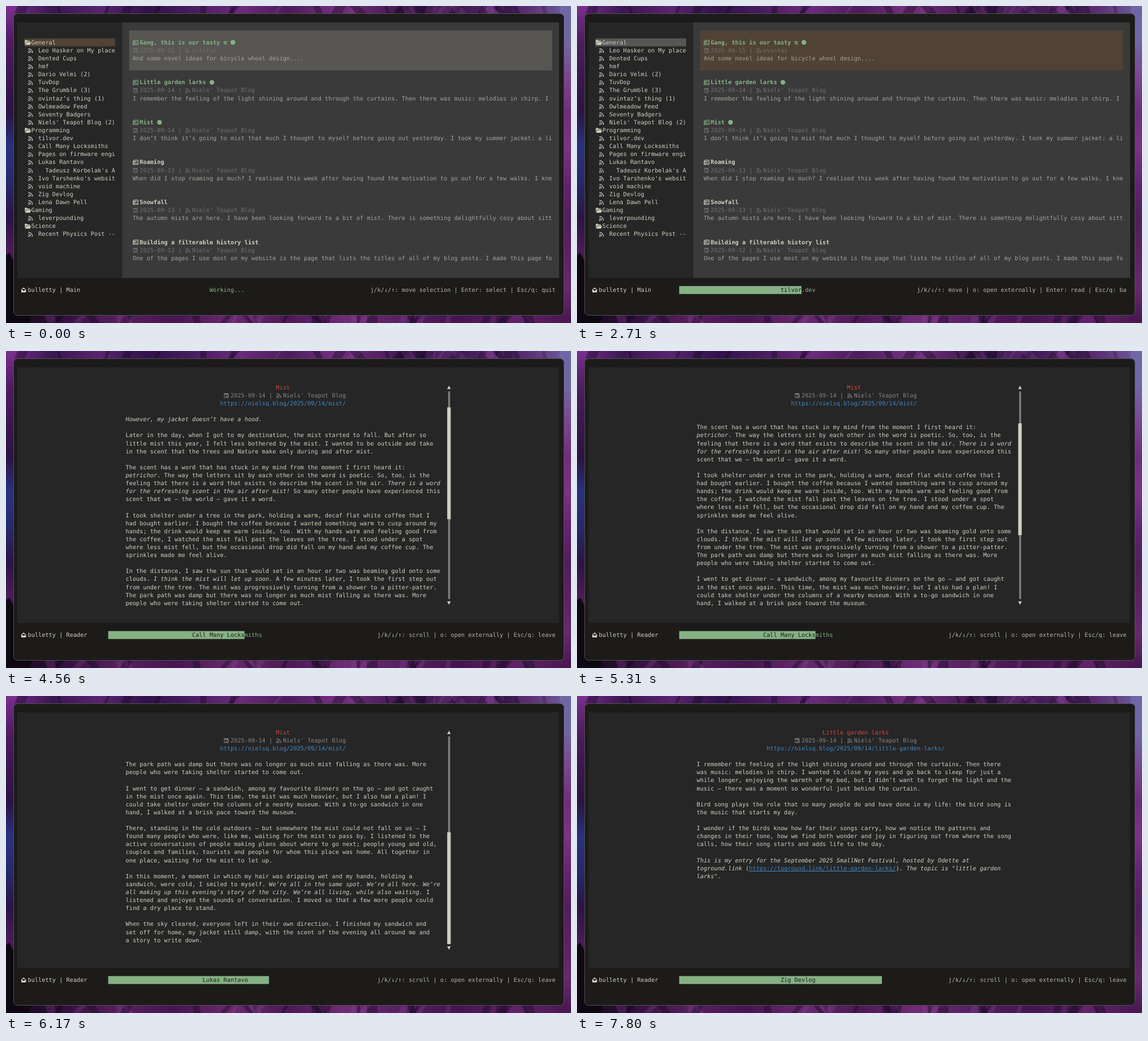
Write an HTML page with a canvas that moves like this. It is 999 px wide and 560 px high and loops after 8 s.

```html
<!DOCTYPE html>
<html lang="en">
<head>
<meta charset="utf-8">
<title>bulletty</title>
<style>
html, body { margin: 0; width: 100%; height: 100%; overflow: hidden; background: #1c1b1a; }
canvas { display: block; width: 999px; height: 560px; }
</style>
</head>
<body>
<canvas id="stage"></canvas>
<script>
const W = 999, H = 560, LOOP = 8000;
const CW = 6.18, CH = 14.11, X0 = 20, Y0 = 29;
const C = {
  frame: '#1c1b1a', side: '#262626', list: '#3a3a3a', fg: '#d0cfc0', text: '#a3a29a',
  faint: '#706f6b', meta: '#858480', hint: '#b5b4a8', green: '#86b184', brown: '#504335',
  grey: '#575653', red: '#d0483f', link: '#4187c4'
};

const canvas = document.getElementById('stage');
const ctx = canvas.getContext('2d');
const dpr = window.devicePixelRatio || 1;
canvas.width = W * dpr;
canvas.height = H * dpr;
ctx.scale(dpr, dpr);

const FONT = (CW / 0.602).toFixed(3) + 'px "DejaVu Sans Mono", "Noto Sans Mono", monospace';
ctx.font = FONT;
ctx.textRendering = 'geometricPrecision';
ctx.letterSpacing = (CW - ctx.measureText('0'.repeat(50)).width / 50).toFixed(4) + 'px';

// ---------- content ----------
const GROUPS = [
  ['General', ['Leo Hasker on My place', 'Dented Cups', 'hmf', 'Dario Velmi', 'TuvDop', 'The Grumble',
    'ovintaz’s thing', 'Owlmeadow Feed', 'Seventy Badgers', "Niels' Teapot Blog"]],
  ['Programming', ['tilvor.dev', 'Call Many Locksmiths', 'Pages on firmware engineering', 'Lukas Rantavo',
    "  Tadeusz Korbelak's Algorithmic Shed", "Ivo Tarshenko's website", 'void machine', 'Zig Devlog', 'Lena Dawn Pell']],
  ['Gaming', ['leverpounding']],
  ['Science', ['Recent Physics Post -- Daily']]
];
const FEEDS = GROUPS.flatMap(g => g[1]);
const TOTAL = 21;
const TEAPOT = FEEDS[9];

const art = (title, date, author, preview, unread) => ({ title, date, author, preview, unread });
const GENERAL = [
  art('Gang, this is our tasty π', '2025-09-15', 'ovintaz', 'And some novel ideas for bicycle wheel design....', true),
  art('Little garden larks', '2025-09-14', TEAPOT, 'I remember the feeling of the light shining around and through the curtains. Then there was music: melodies in chirp. I', true),
  art('Mist', '2025-09-14', TEAPOT, 'I don’t think it’s going to mist that much I thought to myself before going out yesterday. I took my summer jacket: a li', true),
  art('Roaming', '2025-09-13', TEAPOT, 'When did I stop roaming as much? I realised this week after having found the motivation to go out for a few walks. I kne'),
  art('Snowfall', '2025-09-13', TEAPOT, 'The autumn mists are here. I have been looking forward to a bit of mist. There is something delightfully cosy about sitt'),
  art('Building a filterable history list', '2025-09-12', TEAPOT, 'One of the pages I use most on my website is the page that lists the titles of all of my blog posts. I made this page fo')
];

const LINES = [
  'It has been a while since I last wrote about the tools on my desk.',
  'This week I finally sat down and cleaned up the old notes folder.',
  'There is a small trick that makes the whole thing a lot simpler.',
  'A reader asked me how the first version of this came to be made.',
  'Most of the work turned out to be deciding what to leave out of it.',
  'I have been thinking about slow software and quiet evenings lately.',
  'Here is a short list of things that went well, and some that did not.'
];
const feedArticles = (feed, month, unread, titles) => titles.split('|').map((title, i) =>
  art(title, `2025-0${month - (i >> 1)}-${28 - i * 3 - feed}`, FEEDS[feed],
    LINES[(feed * 2 + i) % 7] + ' ' + LINES[(feed + i * 3 + 3) % 7], i < unread));
const PAGES = [
  GENERAL,
  feedArticles(0, 8, 0, 'A desk of my own|Small habits, large effects|On keeping a paper list|The long way home|Three tools I dropped|Quiet weeks'),
  feedArticles(1, 7, 0, 'Things found in drawers|Glue and patience|How to mend a lamp|Spare parts|The second shelf|Loose screws'),
  feedArticles(2, 7, 0, 'cold mornings|last flight out|a room with no windows|supplies|the long night|arrivals'),
  feedArticles(3, 9, 2, 'Writing a reader for the terminal|Weekend projects|Keyboards and me|Notes from a game jam|Why I still use feeds|Hello again')
];

const MIST = `*I don’t think it’s going to mist that much* I thought to myself before going out yesterday.
I took my summer jacket: a light blue denim coat that brings me a lot of joy. My jacket
keeps me warm.

*However, my jacket doesn’t have a hood.*

Later in the day, when I got to my destination, the mist started to fall. But after so
little mist this year, I felt less bothered by the mist. I wanted to be outside and take
in the scent that the trees and Nature make only during and after mist.

The scent has a word that has stuck in my mind from the moment I first heard it:
*petrichor*. The way the letters sit by each other in the word is poetic. So, too, is the
feeling that there is a word that exists to describe the scent in the air. *There is a word
for the refreshing scent in the air after mist!* So many other people have experienced this
scent that we – the world – gave it a word.

I took shelter under a tree in the park, holding a warm, decaf flat white coffee that I
had bought earlier. I bought the coffee because I wanted something warm to cusp around my
hands; the drink would keep me warm inside, too. With my hands warm and feeling good from
the coffee, I watched the mist fall past the leaves on the tree. I stood under a spot
where less mist fell, but the occasional drop did fall on my hand and my coffee cup. The
sprinkles made me feel alive.

In the distance, I saw the sun that would set in an hour or two was beaming gold onto some
clouds. *I think the mist will let up soon.* A few minutes later, I took the first step out
from under the tree. The mist was progressively turning from a shower to a pitter-patter.
The park path was damp but there was no longer as much mist falling as there was. More
people who were taking shelter started to come out.

I went to get dinner – a sandwich, among my favourite dinners on the go – and got caught
in the mist once again. This time, the mist was much heavier, but I also had a plan! I
could take shelter under the columns of a nearby museum. With a to-go sandwich in one
hand, I walked at a brisk pace toward the museum.

There, standing in the cold outdoors – but somewhere the mist could not fall on us – I
found many people who were, like me, waiting for the mist to pass by. I listened to the
active conversations of people making plans about where to go next; people young and old,
couples and families, tourists and people for whom this place was home. All together in
one place, waiting for the mist to let up.

In this moment, a moment in which my hair was dripping wet and my hands, holding a
sandwich, were cold, I smiled to myself. *We’re all in the same spot. We’re all here. We’re
all making up this evening’s story of the city. We’re all living, while also waiting.* I
listened and enjoyed the sounds of conversation. I moved so that a few more people could
find a dry place to stand.

When the sky cleared, everyone left in their own direction. I finished my sandwich and
set off for home, my jacket still damp, with the scent of the evening all around me and
a story to write down.
`;
const LARKS = `I remember the feeling of the light shining around and through the curtains. Then there
was music: melodies in chirp. I wanted to close my eyes and go back to sleep for just a
while longer, enjoying the warmth of my bed, but I didn’t want to forget the light and the
music – there was a moment so wonderful just behind the curtain.

Bird song plays the role that so many people do and have done in my life: the bird song is
the music that starts my day.

I wonder if the birds know how far their songs carry, how we notice the patterns and
changes in their tone, how we find both wonder and joy in figuring out from where the song
calls, how their song starts and adds life to the day.

*This is my entry for the September 2025 SmallNet Festival, hosted by Odette at
toground.link *(~https://toground.link/little-garden-larks/~)*. The topic is "little garden
larks".*`;

// "*" toggles italics, "~" toggles a link; both carry over line ends
function parse(src) {
  let italic = false, link = false;
  return src.split('\n').map(line => {
    const runs = [];
    let col = 0;
    for (const part of line.split(/([*~])/)) {
      if (part === '*') italic = !italic;
      else if (part === '~') link = !link;
      else if (part) {
        runs.push({ part, col, italic, link });
        col += part.length;
      }
    }
    return runs;
  });
}
const READS = {
  1: { lines: parse(LARKS), url: 'https://nielsq.blog/2025/09/14/little-garden-larks/' },
  2: { lines: parse(MIST), url: 'https://nielsq.blog/2025/09/14/mist/', bar: true }
};

// ---------- timeline ----------
const at = (t, steps) => steps.reduce((v, s) => t >= s[0] ? s[1] : v, steps[0][1]);
const VIEW = [[0, 'side'], [2710, 'list'], [3690, 'read'], [6340, 'list'], [7360, 'read']];
const SIDE = [[0, 0], [500, 1], [1160, 2], [1600, 3], [1750, 4], [1910, 3], [2110, 2], [2260, 1], [2410, 0]];
const PICK = [[0, 0], [3030, 1], [3230, 2], [6790, 1]];
const FETCH = [[0, -1], [500, 2], [1600, 5], [1910, 7], [2110, 9], [2710, 10], [3030, 11],
  [5480, 12], [6170, 13], [6790, 14], [7360, 16], [7800, 17]];
const TAPS = [[0, 0], [4090, 1], [4240, 2], [4410, 3], [4560, 4], [4710, 5]];

// Single taps, then a held key
function scrollAt(t) {
  if (t < 5210) return at(t, TAPS);
  if (t >= 7360) return 0;
  const tick = t < 5380
    ? Math.min(5310, 5210 + Math.floor((t - 5210) / 50) * 50)
    : Math.min(5880, 5380 + Math.floor((t - 5380) / 50) * 50);
  return Math.floor(6 + (tick - 5210) / 33.3);
}

const stateAt = t => ({
  view: at(t, VIEW), side: at(t, SIDE), pick: at(t, PICK), fetch: at(t, FETCH),
  scroll: scrollAt(t), seen: t >= 3690
});

// ---------- drawing ----------
const px = col => X0 + col * CW;
const py = row => Y0 + row * CH;

function cells(c0, r0, c1, r1, color) {
  ctx.fillStyle = color;
  ctx.fillRect(px(c0), py(r0), (c1 - c0) * CW, (r1 - r0) * CH);
}
function text(s, col, row, color, style = '') {
  ctx.font = style + ' ' + FONT;
  ctx.fillStyle = color;
  ctx.fillText(s, px(col), py(row) + 10.6);
}
function poly(points, color) {
  ctx.fillStyle = color;
  ctx.beginPath();
  points.forEach(p => ctx.lineTo(p[0], p[1]));
  ctx.fill();
}
function disc(x, y, r, color) {
  ctx.fillStyle = color;
  ctx.beginPath();
  ctx.arc(x, y, r, 0, Math.PI * 2);
  ctx.fill();
}

const ICONS = {
  folder(c) {
    poly([[1, 11], [1, 3], [4.5, 3], [5.5, 4.3], [10, 4.3], [10, 6], [3.5, 6]], c);
    poly([[1.6, 11.6], [4, 6.8], [12.2, 6.8], [10, 11.6]], c);
  },
  rss(c) {
    disc(1.9, 10.6, 1.2, c);
    ctx.lineWidth = 1.2;
    for (const r of [4.2, 7.4]) {
      ctx.beginPath();
      ctx.arc(1, 11.4, r, -Math.PI / 2, 0);
      ctx.stroke();
    }
  },
  news() {
    ctx.strokeRect(2.5, 3.4, 7, 7.6);
    ctx.strokeRect(0.8, 5, 1.7, 6);
    ctx.fillRect(4, 5, 2, 2.4);
    ctx.fillRect(6.8, 5.2, 1.6, 0.9);
    ctx.fillRect(4, 8.6, 4.4, 0.9);
  },
  date() {
    ctx.strokeRect(1.4, 4, 6.6, 7);
    ctx.fillRect(1, 3.4, 7.4, 2);
    ctx.beginPath();
    ctx.arc(6.6, 8.8, 2.2, 0, Math.PI * 2);
    ctx.stroke();
  },
  mail(c) {
    poly([[0.8, 6], [5, 2.6], [9.2, 6], [9.2, 11.4], [0.8, 11.4]], c);
    poly([[2.4, 5.4], [7.6, 5.4], [7.6, 6.8], [5, 8.6], [2.4, 6.8]], C.frame);
  }
};
function icon(name, col, row, color) {
  ctx.save();
  ctx.translate(px(col), py(row));
  ctx.fillStyle = ctx.strokeStyle = color;
  ctx.lineWidth = 1;
  ICONS[name](color);
  ctx.restore();
}

function strip(x, y, w, h, stops) {
  const g = w > h ? ctx.createLinearGradient(x, 0, x + w, 0) : ctx.createLinearGradient(0, y, 0, y + h);
  stops.forEach((s, i) => g.addColorStop(i / (stops.length - 1), s));
  ctx.fillStyle = g;
  ctx.fillRect(x, y, w, h);
}

// Slanted light and dark flecks along the top and bottom edges
function flecks() {
  let seed = 7;
  const rnd = () => (seed = seed * 16807 % 2147483647) / 2147483647;
  for (let i = 0; i < 70; i++) {
    const x = 20 + rnd() * 930, y = i % 2 ? 547 : 0;
    const w = 4 + rnd() * 16, lean = rnd() * 24 - 12;
    poly([[x, y], [x + w, y], [x + w + lean, y + 13], [x + lean, y + 13]],
      rnd() < 0.65 ? 'rgba(22,8,34,.4)' : 'rgba(160,80,175,.22)');
  }
}

function backdrop() {
  strip(0, 0, W, 20, ['#7a3090', '#3a1650', '#5a2370', '#31124a', '#4a1d60', '#6b2a7c', '#4b1c5c', '#74307f', '#52205f', '#331446', '#4a1f5c', '#5a2a70', '#6c62a2']);
  strip(0, 540, W, 20, ['#0d0812', '#32103c', '#56205e', '#451650', '#6a2a70', '#4a1954', '#6f2c76', '#552060', '#43154e', '#602468', '#481650']);
  strip(0, 0, 20, H, ['#7a3090', '#4f1d62', '#3b1750', '#2b1442', '#2a3280', '#262a6a', '#2b1446', '#4a1c56', '#0f0916', '#0d0812']);
  strip(979, 0, 20, H, ['#6f66a6', '#7068a2', '#7a4890', '#6f2e7c', '#7a3484', '#642472', '#521e5e', '#5c2264', '#662a6e', '#481650']);
  flecks();
  poly([[0, 440], [6, 436], [14, 452], [14, 546], [46, 546], [40, 560], [0, 560]], '#0d0812');
  ctx.beginPath();
  ctx.roundRect(13.5, 13.5, 973, 533, 7);
  ctx.fillStyle = C.frame;
  ctx.fill();
  ctx.lineWidth = 1;
  ctx.strokeStyle = '#55504f';
  ctx.stroke();
}

function sidebar(s) {
  cells(0, 0, 30, 32, C.side);
  cells(2, 2 + s.side, 28, 3 + s.side, s.view === 'side' ? C.brown : C.grey);
  const counts = { 3: 2, 5: 3, 6: 1, 9: s.seen ? 1 : 2 };
  let row = 2, n = 0;
  for (const [group, feeds] of GROUPS) {
    icon('folder', 2, row, C.fg);
    text(group, 4, row++, C.fg);
    for (const feed of feeds) {
      const label = feed + (counts[n] ? ` (${counts[n]})` : '');
      icon('rss', 3, row, C.fg);
      text(label.slice(0, 22), 6, row++, C.fg);
      n++;
    }
  }
}

function articles(s) {
  cells(30, 0, 155, 32, C.list);
  cells(32, 1 + s.pick * 5, 153, 6 + s.pick * 5, s.view === 'side' ? C.grey : C.brown);
  PAGES[s.side].forEach((a, i) => {
    const row = 2 + i * 5;
    const unread = a.unread && !(s.seen && a === GENERAL[2]);
    const color = unread ? C.green : C.fg;
    icon('news', 33, row, color);
    text(a.title, 35, row, color, 'bold');
    if (unread) disc(px(36 + a.title.length) + 4.2, py(row) + 7.1, 4.2, C.green);
    byline(a, 33, row + 1, C.faint);
    text(a.preview.slice(0, 120), 33, row + 2, C.text);
  });
}

function byline(a, col, row, color) {
  icon('date', col, row, color);
  text(a.date + ' |', col + 2, row, color);
  icon('rss', col + 15, row, color);
  text(a.author, col + 17, row, color);
}

function scrollbar(scroll) {
  const x = px(123), mid = x + CW / 2, top = py(2), end = py(29);
  poly([[mid, top + 4], [mid + 3.2, top + 10], [mid - 3.2, top + 10]], C.fg);
  poly([[mid, end + 10], [mid + 3.2, end + 4], [mid - 3.2, end + 4]], C.fg);
  ctx.fillStyle = C.fg;
  for (const dx of [2, 4]) ctx.fillRect(Math.round(x) + dx, py(3), 0.9, end - py(3));
  const start = 3 + Math.min(12, Math.round(scroll * 0.49));
  cells(123, start, 124, start + 14, C.fg);
}

function reader(s) {
  const a = GENERAL[s.pick], page = READS[s.pick];
  const center = len => 76 - Math.floor(len / 2);
  cells(0, 0, 155, 32, C.side);
  text(a.title, center(a.title.length), 2, C.red);
  byline(a, center(17 + a.author.length), 3, C.meta);
  text(page.url, center(page.url.length), 4, C.link);
  page.lines.slice(s.scroll, s.scroll + 24).forEach((runs, i) => {
    for (const r of runs) {
      text(r.part, 31 + r.col, 6 + i, r.link ? C.link : C.fg, r.italic ? 'italic' : '');
      if (r.link) ctx.fillRect(px(31 + r.col), Math.round(py(6 + i) + 12), r.part.length * CW, 1);
    }
  });
  if (page.bar) scrollbar(s.scroll);
}

const HINTS = {
  side: 'j/k/↓/↑: move selection | Enter: select | Esc/q: quit',
  list: 'j/k/↓/↑: move | o: open externally | Enter: read | Esc/q: ba',
  read: 'j/k/↓/↑: scroll | o: open externally | Esc/q: leave'
};
function footer(s) {
  icon('mail', 1, 33, C.fg);
  text('bulletty | ' + (s.view === 'read' ? 'Reader' : 'Main'), 3, 33, C.fg);
  const label = s.fetch < 0 ? 'Working...' : FEEDS[s.fetch];
  const col = 26 + Math.floor((68 - label.length) / 2);
  const percent = Math.round((s.fetch + 1) / TOTAL * 100);
  const fill = 26 + Math.round(68 * percent / 100);
  text(label, col, 33, C.green);
  if (fill > 26) {
    ctx.save();
    ctx.beginPath();
    ctx.rect(px(26), py(33), (fill - 26) * CW, CH);
    ctx.clip();
    cells(25, 32, fill + 1, 35, C.green);
    text(label, col, 33, C.frame);
    ctx.restore();
  }
  const hint = HINTS[s.view];
  text(hint, 154 - hint.length, 33, C.hint);
}

function draw(s) {
  backdrop();
  if (s.view === 'read') reader(s);
  else {
    sidebar(s);
    articles(s);
  }
  footer(s);
}

const begin = performance.now();
let shown = '';
function frame() {
  const s = stateAt((performance.now() - begin) % LOOP);
  const key = JSON.stringify(s);
  if (key !== shown) {
    shown = key;
    draw(s);
  }
  requestAnimationFrame(frame);
}
frame();
</script>
</body>
</html>
```
